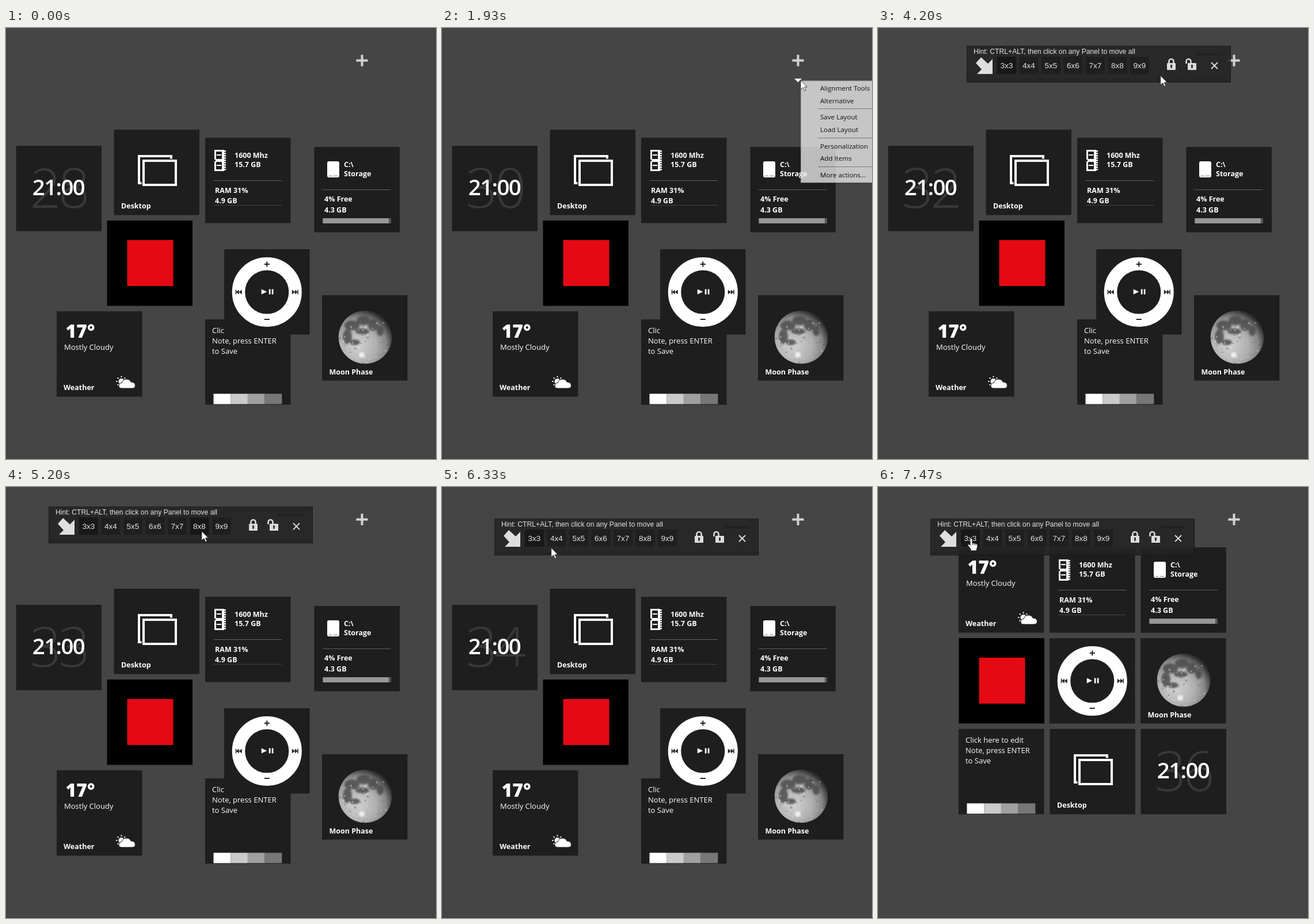
Animation, 747 px wide and 750 px high, one loop 8 s. Source, as an HTML page:

```html
<!DOCTYPE html>
<html lang="en">
<head>
<meta charset="utf-8">
<title>Desktop tiles</title>
<style>
  html, body { margin: 0; width: 100%; height: 100%; overflow: hidden; background: #454545; }
  svg { display: block; width: 100%; height: 100%; }
  text { font: 13px "Open Sans", "Noto Sans", sans-serif; fill: #fff; white-space: pre; }
  .bold { font-size: 12.5px; font-weight: 700; }
  .time { font-size: 38.5px; font-weight: 600; letter-spacing: -1.6px; text-anchor: middle; }
  .seconds { font-size: 96px; font-weight: 300; letter-spacing: -5px; text-anchor: middle; fill: #383838; }
  .degrees { font-size: 32px; font-weight: 800; }
  .menu text { font-size: 11.6px; fill: #000; }
  .bar text { font: 12.15px "Liberation Sans", Arial, sans-serif; fill: #e4e4e4; }
  .bar .size { font-size: 13.5px; text-anchor: middle; }
  .bar .faint { font-size: 8px; font-weight: bold; fill: #1d1d1d; }
</style>
</head>
<body>
<svg viewBox="0 0 747 750">
  <defs>
    <radialGradient id="moonLight" cx=".36" cy=".66" r=".68">
      <stop offset="0" stop-color="#d2d2d2"/>
      <stop offset=".5" stop-color="#b0b0b0"/>
      <stop offset=".78" stop-color="#868686"/>
      <stop offset="1" stop-color="#2c2c2c"/>
    </radialGradient>
    <clipPath id="moonDisc"><circle cx="75" cy="73" r="46.300"/></clipPath>
    <filter id="soft"><feGaussianBlur stdDeviation="1.8"/></filter>
    <pattern id="hatch" width="4" height="7" patternUnits="userSpaceOnUse">
      <path d="M1 1V6" stroke="#1c1c1c"/>
    </pattern>
  </defs>
  <rect width="747" height="750" fill="#454545"/>
  <path d="M0 749.5H747" stroke="#3b3b3b"/>
  <path d="M618.500 46.500V66.500M608.500 56.500H628.500" stroke="#d2d2d2" stroke-width="4"/>
  <g id="tiles"></g>
  <path id="caret" d="M612 88H625L618.500 94.500Z" fill="#fff"/>
  <g id="bar" class="bar"></g>
  <g id="menu" class="menu"></g>
  <g id="cursor">
    <path id="arrow" d="M0 0V16L4 12.500L6.500 18.500L9 17.500L6.500 11.700H11.500Z" fill="#fff" stroke="#222" stroke-width=".8"/>
    <path id="hand" d="M-2 1.500Q0-1 2 1.500V8L9 9.500Q11.500 10.500 11 14L9.500 19V22H-1V19L-6 12.500Q-6 9.500-3.500 11L-2 12.500Z
      M2 8V12M5 9V12M8 9.500V12.500" fill="#fff" stroke="#111" stroke-width="1"/>
  </g>
</svg>
<script>
const LOOP = 8000, STEP = 1000 / 15, TILE = 148.5;
const $ = id => document.getElementById(id);
const text = (x, y, s, cls = 'bold') => `<text x="${x}" y="${y}" class="${cls}">${s}</text>`;
const rect = (x, y, w, h, fill, extra = '') =>
  `<rect x="${x}" y="${y}" width="${w}" height="${h}" fill="${fill}" ${extra}/>`;
const path = (d, fill = '#fff', extra = '') => `<path d="${d}" fill="${fill}" ${extra}/>`;
const line = (d, color, width = 1) => path(d, 'none', `stroke="${color}" stroke-width="${width}"`);
const list = (n, draw) => Array.from({ length: n }, (_, i) => draw(i)).join('');

function moon() {
  let seed = 11;
  const random = () => (seed = seed * 16807 % 2147483647) / 2147483647;
  const seas = [[52, 53, 13, 9], [72, 44, 12, 8], [89, 52, 9, 10], [44, 72, 8, 13], [101, 62, 6, 9], [70, 63, 12, 5], [57, 82, 9, 5]];
  const maria = seas.map(([x, y, a, b]) => `<ellipse cx="${x}" cy="${y}" rx="${a}" ry="${b}"/>`).join('');
  const craters = list(70, i => {
    const x = 30 + random() * 88, y = 48 + random() * 70, r = .6 + random() * 1.6;
    return `<circle cx="${x}" cy="${y}" r="${r}" fill="${i % 2 ? '#e8e8e8' : '#5c5c5c'}" opacity=".4"/>`;
  });
  return `<g clip-path="url(#moonDisc)"><circle cx="75" cy="73" r="47" fill="url(#moonLight)"/>
    <g fill="#474747" opacity=".8" filter="url(#soft)">${maria}</g>
    <circle cx="69" cy="104" r="5" fill="#efefef" filter="url(#soft)"/>${craters}</g>`;
}

function ramIcon() {
  const chips = [24, 42].map(y => rect(19, y, 10, 13, '#1e1e1e') + rect(20, y + 5, 8, 2, '#fff')).join('');
  return rect(16, 21, 17, 37, '#fff') + rect(15, 38, 3, 3, '#1e1e1e') + chips +
    list(9, i => rect(33, 22 + i * 4, 3, 2.5, '#fff'));
}

function wheel() {
  const skip = d => `<g transform="translate(${48.5 * d} 0) scale(${d} 1)">` +
    path('M-5-4L0 0L-5 4ZM0-4L5 0L0 4ZM4.500-4H6V4H4.500Z', '#222') + '</g>';
  return `<g transform="translate(74.250 74.500)"><circle r="49.300" fill="none" stroke="#fff" stroke-width="22.500"/>` +
    line('M-4.500-48.500H4.500M0-53V-44M-4.500 47.500H4.500', '#222', 2) + skip(-1) + skip(1) +
    path('M-9.500-5L0-.500L-9.500 4Z') + rect(3.5, -5, 2.7, 9, '#fff') + rect(8.5, -5, 2.7, 9, '#fff') + '</g>';
}

function sunAndCloud() {
  const rays = list(8, i => `<path d="M0-7V-9.500" stroke="#fff" stroke-width="1.800" transform="rotate(${i * 45})"/>`);
  return `<g transform="translate(112.500 122)"><circle r="5" fill="#fff"/>${rays}</g>` +
    path('M113 134Q108 134 108 129.500Q108 125 113 124.500Q115 118 121 118Q127 118 129 123Q136 123 136.500 129Q136.500 134 131 134Z',
      '#fff', 'stroke="#1e1e1e" stroke-width="1"');
}

const dividers = line('M15 74.500H133', '#606060');
const whiteFrame = 'stroke="#fff" stroke-width="4"';
const tiles = [
  { from: [17.5, 205], to: [456.5, 421], art: `<text id="seconds" class="seconds" x="73.5" y="108"></text>` + text(73.5, 86, '21:00', 'time') },
  { from: [187.5, 177], to: [298.5, 421], art: rect(43.5, 46, 56, 47, 'none', whiteFrame) +
      rect(48, 50.5, 63, 49, '#1e1e1e') + rect(51.5, 54, 56, 42, '#1e1e1e', whiteFrame) + text(12.5, 137, 'Desktop') },
  { from: [346, 191], to: [298, 105], art: ramIcon() + text(51, 35, '1600 Mhz') + text(51, 51, '15.7 GB') + dividers +
      text(17, 96, 'RAM 31%') + text(17, 114, '4.9 GB') + line('M15 117.500H133', '#444') },
  { from: [535.5, 207], to: [456.5, 105], art: rect(22.5, 25, 21, 28, '#fff', 'rx="3"') +
      line('M25.500 50.500H30.500M33.500 50.500H40.500', '#777') + text(51.5, 35, 'C:\\') + text(51.5, 51, 'Storage') + dividers +
      text(17.5, 95, '4% Free') + text(17.5, 114, '4.3 GB') + rect(15, 124, 118.5, 9, '#555') + rect(15, 124, 114.5, 9, '#979797') },
  { from: [175.5, 335], to: [140.5, 263], fill: '#000', art: rect(35, 34, 80, 80, '#e50914') },
  { from: [88, 493], to: [140, 105], art: text(15.5, 46, '17°', 'degrees') + text(13, 67, 'Mostly Cloudy', '') +
      text(12, 137, 'Weather') + sunAndCloud() },
  { from: [346, 507], to: [140, 421], art: text(12, 24, 'Click here to edit', '') + text(12, 42, 'Note, press ENTER', '') +
      text(12, 60, 'to Save', '') + ['#fff', '#cbcbcb', '#a0a0a0', '#777'].map((c, i) => rect(14.5 + i * 29.7, 129.5, 29.7, 18, c)).join('') },
  { from: [379, 385], to: [298, 263], art: wheel() },
  { from: [549, 465], to: [456, 263], art: moon() + text(12.5, 137.5, 'Moon Phase') }
];
$('tiles').innerHTML = tiles.map(t => `<g>${rect(0, 0, TILE, TILE, t.fill || '#1e1e1e')}${t.art}</g>`).join('');
const tileNodes = [...$('tiles').children];

const menuItems = [['Alignment Tools', 109], ['Alternative', 131], ['Save Layout', 159], ['Load Layout', 181],
  ['Personalization', 210], ['Add Items', 231], ['More actions...', 260]];
$('menu').innerHTML = rect(625, 94, 130, 178, '#000', 'opacity=".25"') +
  rect(623.5, 92, 130, 177, '#f0f0f0', 'stroke="#b4b4b4"') +
  rect(625, 94, 125, 22, '#d8d8d8', 'id="highlight"') +
  line('M653 140.500H747M653 191.500H747M653 241.500H747', '#8c8c8c') +
  menuItems.map(([label, y]) => text(657, y, label, '')).join('');

const padlock = (x, shackle) => rect(x, 30, 15, 12, '#dcdcdc', 'rx="1"') + line(shackle, '#dcdcdc', 2.6) +
  path(`M${x + 6} 33h3v2l-.5 4h-2l-.5-4z`, '#292929');
$('bar').innerHTML = rect(.5, .5, 458, 63, '#242424', 'stroke="#151515" opacity=".86"') +
  rect(1, 56, 457, 7, 'url(#hatch)') + text(12, 14, 'Hint: CTRL+ALT, then click on any Panel to move all', '') +
  text(398, 17, 'Dimensions', 'faint') + path('M25 20L37 31L45 23V49H18L26 41L16 30Z', '#dedede') +
  list(7, i => rect(53 + i * 38.5, 19, 33, 30, i ? '#1f1f1f' : '#181818', `id="size${i + 3}"`) +
    text(69.5 + i * 38.5, 38.5, `${i + 3}x${i + 3}`, 'size')) +
  padlock(348, 'M351.500 31V27A4 4 0 0 1 359.500 27V31') + padlock(384, 'M381.500 31V27A4 4 0 0 1 389.500 27V31') +
  line('M425 29L436 40M436 29L425 40', '#dedede', 1.8);

// Each track lists [time, x, y].
const barTrack = [[4470, 154, 31], [4670, 132, 60], [4800, 106, 71], [4930, 82, 54], [5070, 70, 30],
  [5130, 71, 26], [5200, 74, 34], [5330, 79, 42], [5730, 91, 55]];
const cursorTrack = [[130, 732, 738], [400, 716, 470], [660, 692, 230], [930, 665, 108], [1400, 623, 91],
  [2270, 623, 91], [2670, 657, 104], [3730, 657, 104], [4400, 420, 74], [4470, 420, 74]];
const returnTrack = [[5870, 357, 98], [6330, 190, 106], [6730, 163, 100], [7070, 162, 89]];

function at(track, t) {
  const i = track.findIndex(key => key[0] > t);
  if (i < 1) return (i ? track[track.length - 1] : track[0]).slice(1);
  const [t0, x0, y0] = track[i - 1], [t1, x1, y1] = track[i];
  const k = (t - t0) / (t1 - t0);
  return [x0 + (x1 - x0) * k, y0 + (y1 - y0) * k];
}
const ramp = (t, start, end) => Math.min(1, Math.max(0, (t - start) / (end - start)));
const show = (id, on) => $(id).setAttribute('visibility', on ? 'visible' : 'hidden');
const place = (node, [x, y]) => node.setAttribute('transform', `translate(${x} ${y})`);
const secondTicks = [400, 1400, 2400, 3465, 4465, 5465, 6465, 7465];

function render(now) {
  const t = Math.floor((now % LOOP + 4) / STEP) * STEP;
  const barAt = at(barTrack, t), arranged = t >= 7395;
  const dragging = t > 4470 && t < 5800;

  tiles.forEach((tile, i) => place(tileNodes[i], arranged ? tile.to : tile.from));
  $('seconds').textContent = 28 + secondTicks.filter(tick => t >= tick).length;

  show('caret', t > 1060 && t < 3730);
  $('menu').setAttribute('opacity', t < 3665 ? ramp(t, 1740, 1995) : 0);
  show('highlight', t > 2460);
  place($('bar'), barAt);
  $('bar').setAttribute('opacity', ramp(t, 3660, 3870));
  $('size8').setAttribute('fill', dragging ? '#171717' : '#1f1f1f');

  const hand = t > 1260 && t < 1795 || t > 6860;
  show('cursor', t > 129);
  $('arrow').style.display = hand ? 'none' : '';
  $('hand').style.display = hand ? '' : 'none';
  place($('cursor'), dragging ? [barAt[0] + 266, barAt[1] + 43] : at(t < 5000 ? cursorTrack : returnTrack, t));
}

function frame() {
  render(performance.now());
  requestAnimationFrame(frame);
}
frame();
</script>
</body>
</html>
```
